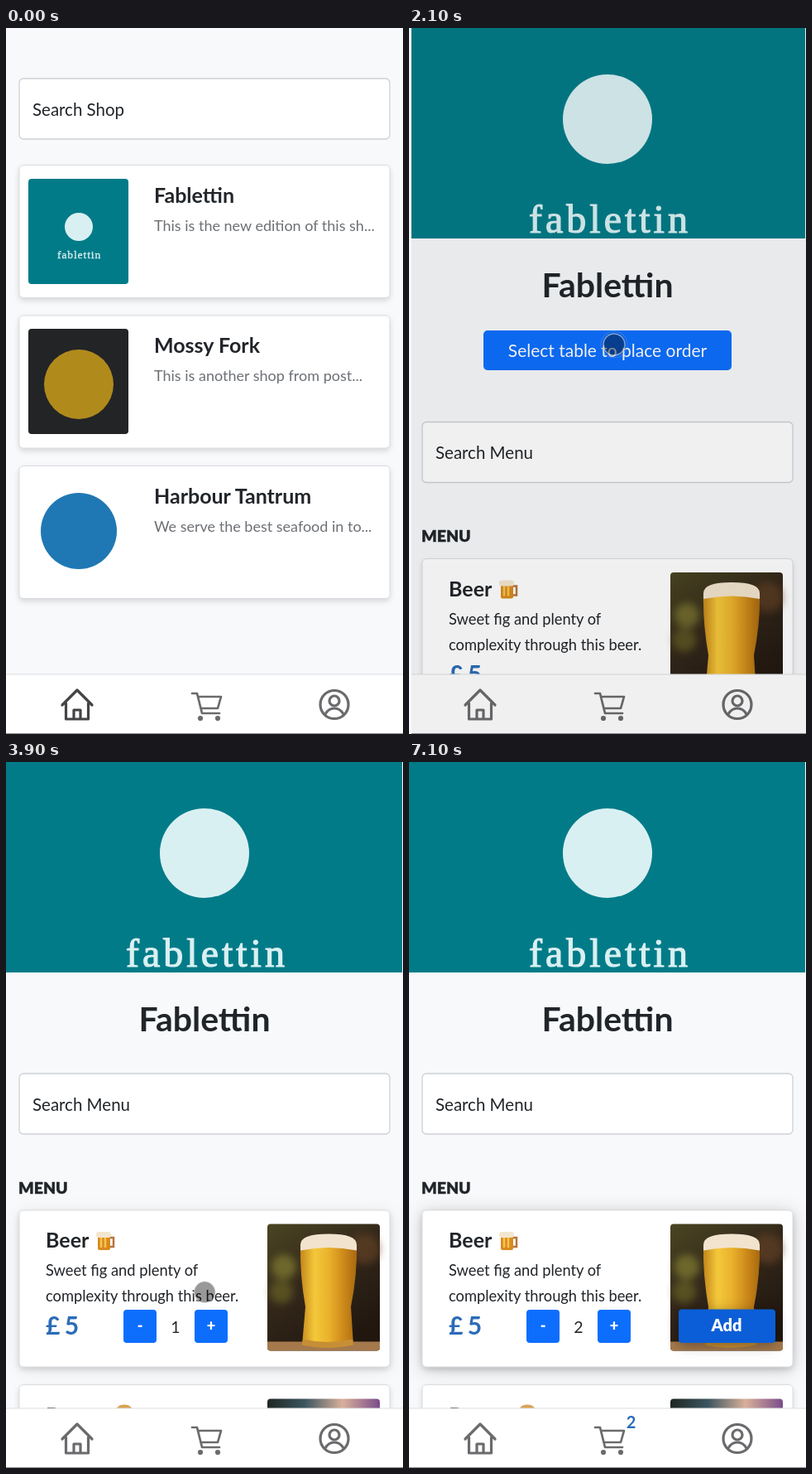
An HTML page for the animation above (7200 ms loop, 480 by 852 pixels).

```html
<!DOCTYPE html>
<html lang="en">
<head>
<meta charset="utf-8">
<title>Table ordering</title>
<style>
html, body { margin: 0; width: 100%; height: 100%; overflow: hidden; background: #f8f9fb; }
svg { display: block; width: 100%; height: 100%; font-family: Lato, "Open Sans", sans-serif; }
.card { fill: #fff; stroke: #d9dcdf; filter: drop-shadow(0 3px 3px #0002); }
.lift { fill: #fff; filter: drop-shadow(0 3px 11px #0003); }
.field { fill: #fff; stroke: #cdd1d6; stroke-width: 1.3; }
.icon { fill: none; stroke: #6b6b6e; stroke-width: 3.2; stroke-linejoin: round; stroke-linecap: round; }
</style>
</head>
<body>
<svg id="stage" viewBox="0 0 480 852" xmlns="http://www.w3.org/2000/svg"></svg>
<script>
const LOOP = 7200;
const INK = '#212529', GREY = '#6c7075', BLUE = '#0d6efd', DEEP = '#0b5ed7', TEAL = '#027b88', PALE = '#d9f0f2';

const rect = (x, y, w, h, attrs = '') => `<rect x="${x}" y="${y}" width="${w}" height="${h}" ${attrs}/>`;
const circle = (x, y, r, attrs = '') => `<circle cx="${x}" cy="${y}" r="${r}" ${attrs}/>`;
const path = (d, attrs = '') => `<path d="${d}" ${attrs}/>`;
const text = (x, y, size, s, attrs = '') =>
  `<text x="${x}" y="${y}" font-size="${size}" fill="${INK}" ${attrs}>${s}</text>`;
const group = (body, attrs = '') => `<g ${attrs}>${body}</g>`;
const at = (x, y, body) => group(body, `transform="translate(${x} ${y})"`);
const fill = c => `fill="${c}"`;
const centred = (c, weight) => `text-anchor="middle" style="fill:${c};font-weight:${weight}"`;

const field = (y, label) => rect(16, y, 448, 73, 'rx="5" class="field"') + text(32, y + 44.5, 20.5, label);

// Small pictograms, each centred on its own origin
const mug =
  path('M5-4H10V7H5', 'fill="none" stroke="#b9733c" stroke-width="2.5"') +
  rect(-9, -8, 15, 19, 'rx="2" fill="#d98a1e"') +
  path('M-5-4V8M0-4V8', 'stroke="#f6c552" stroke-width="2.5"') +
  rect(-11, -11, 18, 7, 'rx="3" fill="#f3e6cf"');
const windowPane =
  rect(-8, -11, 16, 23, 'fill="#eef4f8" stroke="#7d6250" stroke-width="2"') +
  path('M-8 0H8', 'stroke="#7d6250" stroke-width="2"') + rect(-10, 11, 20, 2.5, fill('#8d6f5b'));
const door =
  rect(-8, -12, 17, 25, fill('#a4561f')) +
  path('M-5-8H5M-5-3H5M-5 5H5M-5 9H5', 'stroke="#733510" stroke-width="2"') + circle(6, 1, 1.5, fill('#f0c04a'));
const plant =
  path('M0 4C-14 0-12-6-9-7Q-3-5 0 1Q-5-10 0-13Q6-9 0 1Q5-7 11-6Q11 2 0 4', fill('#4c8b55')) +
  path('M-8 2H8L5 13H-5Z', fill('#c9743a')) + rect(-9, 2, 18, 3, fill('#dd8d4f'));
const flame =
  path('M-1-13Q8-7 7-2L9-5Q15 12 0 13Q-15 11-8-3L-5 0Q-5-7-1-13', fill('#ee6a22')) +
  path('M0-3Q8 4 6 9Q0 15-6 9Q-5 4 0-3', fill('#ffd04d'));

// Shop list
const shopCard = (y, name, blurb, badge) =>
  rect(16, y, 448, 160, 'rx="5" class="card"') + badge +
  text(179, y + 45, 25, name, 'font-weight="700"') +
  text(179, y + 79, 18, blurb, `style="fill:${GREY}"`);
const wordmark = (x, y, size, gap) =>
  text(x, y, size, 'fablettin', `font-family="'Liberation Serif', serif" stroke="${PALE}" ` +
    `stroke-width="${size / 40}" style="fill:${PALE};letter-spacing:${gap}px"`);
const listPage =
  field(61, 'Search Shop') +
  shopCard(165.5, 'Fablettin', 'This is the new edition of this sh...',
    rect(27, 182, 121, 127, `rx="4" fill="${TEAL}"`) + circle(88, 240, 17, fill(PALE)) + wordmark(62, 278, 13.5, 0.9)) +
  shopCard(347, 'Mossy Fork', 'This is another shop from post...',
    rect(27, 363, 121, 127, 'rx="4" fill="#232426"') + circle(88, 430, 42, fill('#b18a1c'))) +
  shopCard(528.5, 'Harbour Tantrum', 'We serve the best seafood in to...',
    circle(88, 607, 46, fill('#1f78b4')));

// Shop page
const beerPhoto = y => at(316, y,
  rect(0, 0, 136, 153, 'rx="4" fill="url(#dusk)"') +
  group(circle(20, 52, 15, fill('#8f8a34')) + circle(17, 82, 14, fill('#6f6a28')) +
    circle(118, 30, 18, fill('#6b4526')), 'opacity=".6" filter="url(#soft)"') +
  path('M0 142H136V149Q136 153 132 153H4Q0 153 0 149Z', fill('#a5794c')) +
  path('M40 25Q39 60 46 100L42 146Q73 152 104 146L101 100Q109 60 108 25Z', 'fill="url(#ale)"') +
  path('M43 139Q73 146 103 139L104 146Q73 153 42 146Z', fill('#c78f35')) +
  path('M40 25Q40 12 74 12Q108 12 108 25L108 32Q74 25 40 32Z', fill('#f1e3cd')));

const qtyButton = (x, y, sign, id = '') =>
  rect(x, y, 40, 40, `rx="4" fill="${BLUE}" ${id}`) + text(x + 20, y + 25.5, 18, sign, centred('#fff', 900));

const menuCard =
  rect(16, 0, 448, 189, 'rx="5" class="lift" id="lift"') +
  rect(16, 0, 448, 189, 'rx="5" class="card"') +
  text(48, 45, 25, 'Beer', 'font-weight="700"') + at(120, 37, mug) +
  text(48, 79, 18.3, 'Sweet fig and plenty of') +
  text(48, 110, 18.3, 'complexity through this beer.') +
  text(48, 150, 30, '£ 5', 'style="fill:#2b6cb8;font-weight:700;word-spacing:-2px"') +
  beerPhoto(16.5) +
  group(
    qtyButton(142, 120, '-') +
    rect(225, 117, 46, 46, 'rx="6" fill="none" stroke="#8fb9f0" stroke-width="5" id="focus"') +
    qtyButton(228, 120, '+', 'id="plus"') +
    text(205, 148, 19.5, '1', 'text-anchor="middle" id="count"'), 'id="qty"') +
  group(
    rect(326, 119.5, 117, 40.5, `rx="4" fill="${BLUE}" id="addBox" style="filter:drop-shadow(0 3px 8px #0005)"`) +
    text(384, 145.5, 20, 'Add', centred('#fff', 900)), 'id="add"');

const nextCard =
  rect(16, 0, 448, 189, 'rx="5" class="card"') +
  text(48, 45, 25, 'Burger', 'font-weight="700"') +
  path('M132 37Q132 24 143 24Q154 24 154 37Z', fill('#d9a253')) +
  rect(316, 17, 136, 153, 'rx="4" fill="url(#party)"');

const shopPage =
  rect(0, 0, 479, 254, fill(TEAL)) + circle(240, 110, 54, fill(PALE)) + wordmark(145, 247, 48, 4) +
  text(240, 325, 41, 'Fablettin', centred(INK, 700)) +
  group(rect(90, 365, 300, 48, `rx="5" fill="${BLUE}"`) +
    text(240, 397, 21, 'Select table to place order', centred('#fff', 400)), 'id="choose"') +
  group(field(475.5, 'Search Menu') +
    text(15, 620, 19.5, 'MENU', `font-weight="900" stroke="${INK}" stroke-width=".4"`) +
    at(0, 640.5, menuCard) + at(0, 851, nextCard), 'id="menu"');

// Bottom bar, drawer and overlays
const nav =
  rect(-1, 780, 482, 80, 'fill="#fff" stroke="#dcdfe2"') +
  group(
    path('M68 817L86 799L104 817M72.5 815V834H99.5V815M82 834V823H90V834', 'id="home"') +
    path('M225 803H231L237 827H258M232 807H260L256 821H236', 'stroke-width="2.7"') +
    circle(235, 833, 1.5) + circle(256, 833, 1.5) +
    circle(397, 816.5, 17) + circle(397, 812, 6) + path('M386 828Q390 821 397 821Q404 821 408 828'), 'class="icon"') +
  text(268.5, 804, 20, '2', `id="badge" ${centred('#2b6cb8', 700)}`) +
  rect(0, 851, 480, 1, fill('#8d8e90'));

const tableCard = (y, name, x, sign) =>
  rect(20, y, 439, 73, 'rx="5" class="card"') + text(38, y + 45.5, 25, name) + at(x, y + 37, sign);
const drawer =
  rect(0, 0, 480, 852, fill('#f8f9fb')) + text(20, 47, 26, 'Select Table') +
  path('M440 30L457 47M457 30L440 47', 'class="icon" style="stroke-width:2.6"') +
  tableCard(109.5, 'Window', 144, windowPane) + tableCard(204, 'Door', 113, door) +
  tableCard(298.5, 'Garden', 138, plant) + tableCard(393, 'Fire Place', 167, flame);

const toast = path('M0 824H152Q158 824 158 830V852H0Z', fill('#000')) +
  text(7, 844, 15.2, 'Waiting for om-k....', 'font-family="Inter, sans-serif" style="fill:#fff;font-weight:500"');

const pointer =
  group(circle(0, 0, 28, 'fill="none" stroke="#fff" stroke-width="5" opacity=".8"') +
    circle(0, 0, 28, 'fill="none" stroke="#111" stroke-width="2"'), 'id="ripple"') +
  circle(0, 0, 13, 'fill="#000" fill-opacity=".4" stroke="#fff" stroke-opacity=".45" stroke-width="1.5"');

const gradient = (id, colours, attrs = '') => `<linearGradient id="${id}" ${attrs}>` +
  colours.map((c, i) => `<stop offset="${i / (colours.length - 1)}" stop-color="${c}"/>`).join('') + '</linearGradient>';

document.getElementById('stage').innerHTML =
  '<defs>' + gradient('dusk', ['#4a4522', '#33271a', '#21170f'], 'x2=".6" y2="1"') +
  gradient('ale', ['#c4861b', '#f4c83a', '#eab22c', '#cf8c1b', '#a8690f']) +
  gradient('party', ['#1f2622', '#3b5560', '#d9b09a', '#7a4c8a']) +
  '<filter id="soft"><feGaussianBlur stdDeviation="5"/></filter></defs>' +
  rect(0, 0, 480, 852, fill('#f8f9fb')) +
  group(listPage, 'id="list"') + group(shopPage, 'id="shop"') + nav +
  rect(0, 0, 480, 852, 'id="shade"') + group(drawer, 'id="drawer"') +
  group(toast, 'id="toast"') + group(pointer, 'id="pointer"');

const el = {};
document.querySelectorAll('#stage [id]').forEach(node => el[node.id] = node);

// Timeline, in ms
const OPEN_SHOP = 900, OPEN_DRAWER = 2089, TABLE_CHOSEN = 2900, PLUS = 4350, ADD = 5310, ADDED = 5500;
const CLICKS = [833, OPEN_DRAWER, 2490, PLUS, ADD];
const RIPPLE = 200;
const ROUTE = [
  [100, 300, 806], [780, 289, 236], [1000, 289, 236], [1650, 248, 382], [2300, 248, 382],
  [2480, 158, 331], [3200, 158, 331], [4100, 252, 684], [4570, 252, 684],
  [5150, 388, 682], [5950, 388, 682], [6750, 262, 844]
];

const clamp = v => Math.max(0, Math.min(1, v));
const progress = (t, start, length) => clamp((t - start) / length);
const smooth = p => p * p * (3 - 2 * p);
const show = (node, on) => node.setAttribute('display', on ? 'inline' : 'none');
const set = (node, attrs) => { for (const k in attrs) node.setAttribute(k, attrs[k]); };

function pointerAt(t) {
  const i = ROUTE.findIndex(stop => stop[0] > t);
  if (i < 0) return ROUTE[ROUTE.length - 1].slice(1);
  if (i === 0) return ROUTE[0].slice(1);
  const [t0, x0, y0] = ROUTE[i - 1], [t1, x1, y1] = ROUTE[i];
  const p = smooth((t - t0) / (t1 - t0));
  return [x0 + (x1 - x0) * p, y0 + (y1 - y0) * p];
}

function draw(t) {
  const [x, y] = pointerAt(t);
  const inShop = t >= OPEN_SHOP, seated = t >= TABLE_CHOSEN, counted = t >= PLUS;
  const drawerOpen = t >= OPEN_DRAWER && !seated;
  const overAdd = x > 326 && x < 443;

  show(el.list, !inShop);
  show(el.shop, inShop);
  show(el.choose, !seated);
  set(el.menu, { transform: `translate(0 ${seated ? -99.5 : 0})` });
  set(el.home, { stroke: inShop ? '#6b6b6e' : '#444447' });

  show(el.qty, seated);
  show(el.add, counted);
  show(el.focus, counted && t < ADD);
  el.count.textContent = counted ? 2 : 1;
  set(el.lift, { opacity: seated ? progress(t, 3820, 200) : 0 });
  set(el.plus, { fill: seated && t < 5000 && y > 661 && x < 275 ? DEEP : BLUE });
  set(el.addBox, { fill: t >= ADD || (counted && overAdd) ? DEEP : BLUE });
  show(el.badge, t >= ADDED);

  show(el.shade, drawerOpen);
  show(el.drawer, drawerOpen);
  set(el.shade, { opacity: 0.5 * progress(t, OPEN_DRAWER, 100) });
  set(el.drawer, { transform: `translate(${-480 * (1 - smooth(progress(t, OPEN_DRAWER, 263)))} 0)` });
  show(el.toast, seated && t < 3500);

  show(el.pointer, t >= 100 && t < 6800);
  set(el.pointer, { transform: `translate(${x} ${y})` });
  const click = CLICKS.find(c => t >= c && t < c + RIPPLE);
  const spread = progress(t, click ?? 0, RIPPLE);
  show(el.ripple, click !== undefined);
  set(el.ripple, { opacity: clamp(spread * 2) });
  for (const ring of el.ripple.children) set(ring, { r: 13 + 18 * spread });
}

const start = performance.now();
function tick() {
  draw((performance.now() - start) % LOOP);
  requestAnimationFrame(tick);
}
tick();
</script>
</body>
</html>
```
